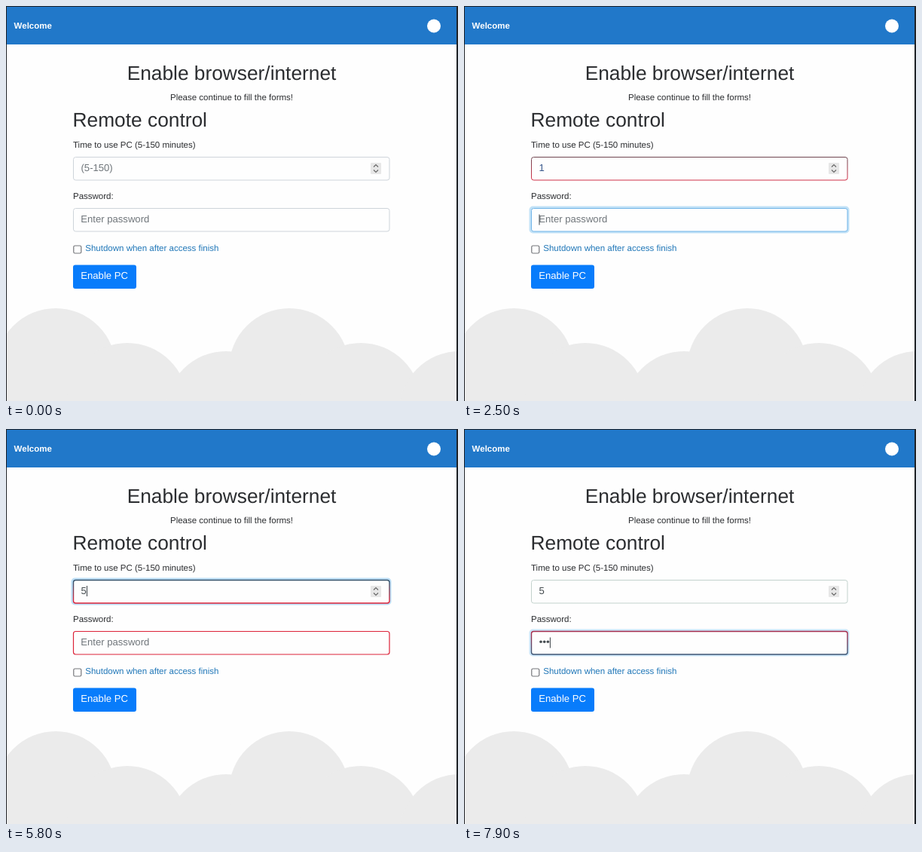
Animation, 600 px wide and 524 px high, one loop 8 s. Source, as an HTML page with a canvas:

```html
<!DOCTYPE html>
<html lang="en">
<head>
<meta charset="utf-8">
<title>Remote control form</title>
<style>
html, body { margin: 0; width: 100%; height: 100%; overflow: hidden; background: #fefefe; }
canvas { display: block; width: 600px; height: 524px; }
</style>
</head>
<body>
<canvas id="stage"></canvas>
<script>
const W = 600, H = 524, LOOP = 8000;
const canvas = document.getElementById('stage');
const ratio = window.devicePixelRatio || 1;
canvas.width = W * ratio;
canvas.height = H * ratio;
const ctx = canvas.getContext('2d');
ctx.scale(ratio, ratio);

const INK = '#2b2d30', HINT = '#70767b', ENTRY = '#454c50';
const PLAIN = '#ced4da', BLUE = '#70b4e8', RED = '#dc2238', DARK = '#35526b';

// Field look: upper and lower border colour, glow strength, border width.
const look = (top, bottom = top, glow = 0, width = 1) => ({ top, bottom, glow, width });
const idle = look(PLAIN);
const focused = look(BLUE, BLUE, 1);
const invalid = look(RED, RED, 0, 1.2);
const invalidFocus = look(DARK, RED, 1, 1.4);

// Each step changes only the listed properties.
const steps = [
  [0, { time: '', pass: 0, timeLook: idle, passLook: idle, caret: null, button: '#087cfb', ink: ENTRY }],
  [100, { timeLook: look('#9fc8ea', '#9fc8ea', 0.5), caret: 'time', button: '#0473ec' }],
  [200, { timeLook: focused, button: '#0069d9' }],
  [1000, { time: '1', button: '#087cfb', ink: '#2b4841' }],
  [1300, { caret: null }],
  [2400, { timeLook: look('#8c9bc0', '#b07a98', 0.4), passLook: look('#9fc8ea', '#9fc8ea', 0.5), caret: 'pass', ink: '#38588c' }],
  [2500, { timeLook: look('#70454f', '#cf3048'), passLook: look(BLUE, BLUE, 0.9) }],
  [2600, { timeLook: invalid, passLook: focused }],
  [3700, { caret: null }],
  [4900, { timeLook: look('#4a4a58', '#d8243c', 0.1, 1.4), passLook: look('#9aa9b4', '#8299aa'), caret: 'time', ink: '#2b4841' }],
  [5000, { timeLook: look(DARK, RED, 0.6, 1.4), passLook: look('#c05a6c', '#b04a5e') }],
  [5100, { timeLook: invalidFocus, passLook: invalid }],
  [5800, { time: '5', ink: ENTRY }],
  [5900, { timeLook: look('#44759c', '#b0627c', 1, 1.2) }],
  [6000, { timeLook: look('#5d9bca', '#8798ba', 1) }],
  [6100, { timeLook: focused }],
  [7100, { timeLook: look('#80bbe6', '#80bbe6', 0.9), caret: 'pass' }],
  [7200, { timeLook: look('#c3d2cd'), passLook: look('#a52c4c', '#3f5573', 0.8, 1.4) }],
  [7700, { pass: 2 }],
  [7900, { pass: 3 }]
];

function stateAt(t) {
  const state = {};
  for (const [start, change] of steps) if (t >= start) Object.assign(state, change);
  return state;
}

function text(str, x, y, size, color = INK, align = 'left', weight = 'normal') {
  ctx.font = `${weight} ${size}px "Liberation Sans", Arial, sans-serif`;
  ctx.textRendering = 'geometricPrecision';
  ctx.textAlign = align;
  ctx.fillStyle = color;
  ctx.fillText(str, x, y);
}

function box(x, y, w, h, r, fill, stroke, width = 1) {
  ctx.beginPath();
  ctx.roundRect(x, y, w, h, r);
  if (fill) { ctx.fillStyle = fill; ctx.fill(); }
  if (stroke) { ctx.strokeStyle = stroke; ctx.lineWidth = width; ctx.stroke(); }
}

function disc(x, y, r, color) {
  ctx.fillStyle = color;
  ctx.beginPath();
  ctx.arc(x, y, r, 0, Math.PI * 2);
  ctx.fill();
}

function field(y, style) {
  if (style.glow) box(86.5, y - 2.5, 425, 36, 5, `rgba(70, 165, 230, ${0.36 * style.glow})`);
  const edge = ctx.createLinearGradient(0, y, 0, y + 31);
  edge.addColorStop(0.1, style.top);
  edge.addColorStop(0.9, style.bottom);
  box(89.5, y + 0.5, 419.5, 30.5, 3, '#fefefe', edge, style.width);
}

function caret(x, y) {
  ctx.fillStyle = '#3b4248';
  ctx.fillRect(x, y, 1, 14);
}

function spinner() {
  box(484, 208, 14, 15, 1, '#e7e7e7');
  ctx.strokeStyle = '#666';
  ctx.lineWidth = 1.1;
  for (const dir of [-1, 1]) {
    ctx.beginPath();
    ctx.moveTo(488, 215.5 + dir * 2);
    ctx.lineTo(491, 215.5 + dir * 5);
    ctx.lineTo(494, 215.5 + dir * 2);
    ctx.stroke();
  }
}

function clouds() {
  for (let x = -310; x < W + 310; x += 310) {
    disc(x + 66, 481, 80, '#ebebeb');
    disc(x + 161, 527, 80, '#ebebeb');
    disc(x + 292, 538, 80, '#ebebeb');
  }
}

function page() {
  ctx.fillStyle = '#fefefe';
  ctx.fillRect(0, 0, W, H);
  clouds();
  ctx.fillStyle = '#2178c9';
  ctx.fillRect(0, 0, W, 51);
  ctx.fillStyle = '#202328';
  ctx.fillRect(0, 0, W, 1);
  ctx.fillRect(0, 0, 1, H);
  ctx.fillRect(598, 0, 2, H);

  text('Welcome', 10.6, 30, 11.5, '#fff', 'left', 'bold');
  disc(568, 26.5, 9, '#fff');
  text('Enable browser/internet', 299.5, 98, 26.3, INK, 'center');
  text('Please continue to fill the forms!', 299.5, 125.3, 11.5, INK, 'center');
  text('Remote control', 88.6, 160, 26.3);
  text('Time to use PC (5-150 minutes)', 89, 188, 11.5);
  text('Password:', 89, 256.3, 11.5);
  box(89.8, 318, 10, 10, 1.8, '#fff', '#74767a', 1.2);
  text('Shutdown when after access finish', 105.3, 325, 11.5, '#2077b8');
}

function draw(t) {
  const s = stateAt(t);
  page();

  field(200, s.timeLook);
  spinner();
  text(s.time || '(5-150)', 99.5, 218.7, 13.1, s.time ? s.ink : HINT);
  if (s.caret === 'time') caret(s.time ? 107 : 99.5, 208);

  field(268, s.passLook);
  if (s.pass) {
    for (let i = 0; i < s.pass; i++) disc(102 + i * 4.7, 282.3, 1.8, ENTRY);
  } else {
    text('Enter password', 99.3, 287, 13.1, HINT);
  }
  if (s.caret === 'pass') caret(99.5 + s.pass * 4.8, 276.5);

  box(89, 343.5, 84, 31.5, 3, s.button);
  text('Enable PC', 99.3, 362, 13.1, '#fff');
}

const begin = performance.now();
function frame() {
  draw((performance.now() - begin) % LOOP);
  requestAnimationFrame(frame);
}
frame();
</script>
</body>
</html>
```
